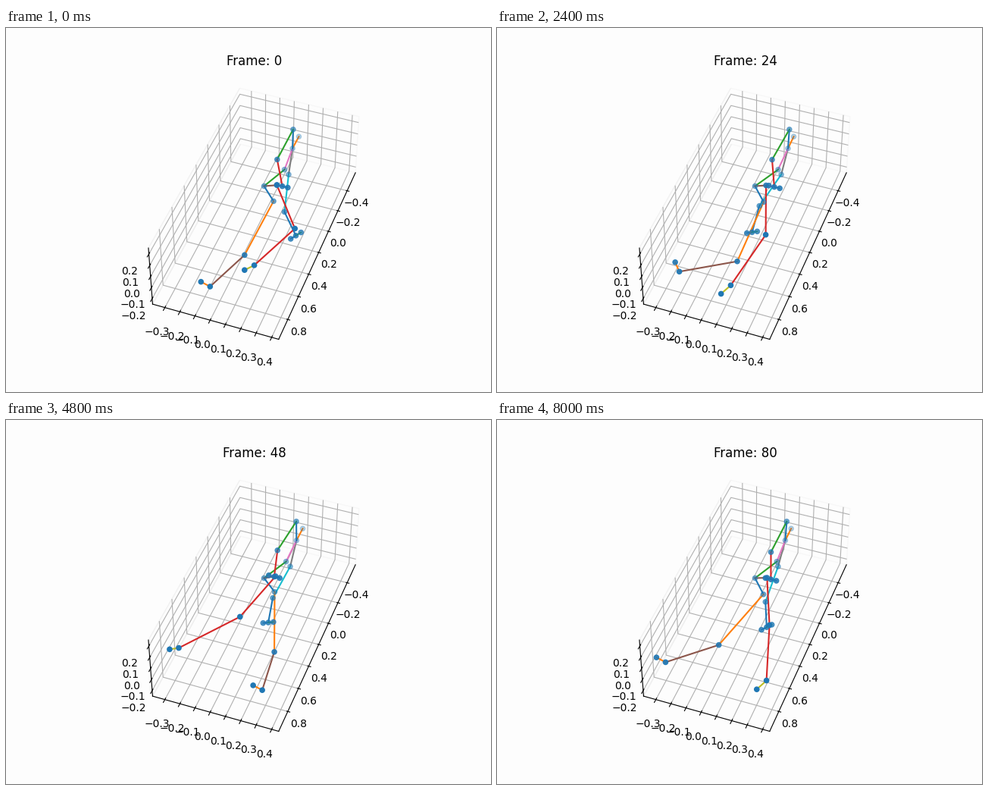
These frames come from a looping animation (640x480 px, 8.1 s). A matplotlib script:

```python
import numpy as np
import matplotlib.pyplot as plt
from matplotlib.animation import FuncAnimation

FRAMES, INTERVAL = 81, 100
STRIDE = 66  # frames per walking cycle
time = np.arange(FRAMES)


def wave(amp, peak, order=1):
    """Harmonic of the walking cycle with a crest at the given time."""
    return amp * np.cos(2 * np.pi * order * (time - peak) / STRIDE)


def flick(when):
    """Short push-off of a foot as its swing begins."""
    return np.exp(-((time - when) / 4) ** 2)


def path(x, y):
    return np.column_stack(np.broadcast_arrays(x, y, time)[:2])


# Screen paths; suffix a or 2 is the side nearer to the viewer.
joints = {
    "pelvis": path(340.5, 208.5),
    "spine": path(369.5 + wave(2, 32), 186.7),
    "neck": path(382 + wave(4, 35), 158.8),
    "head": path(390 + wave(3.7, 36), 143.2),
    "shoulder_a": path(382.9 + wave(4, 32), 133.8),
    "elbow_a": path(360 + wave(3, 25), 173 + wave(1.2, 13)),
    "wrist_a": path(361 + wave(4, 13) + wave(4, 28, 2), 208.4 + wave(1.8, 15)),
    "shoulder_b": path(374.5 + wave(3.4, 38) + wave(1.5, 0, 2), 193.2),
    "elbow_b": path(354.5 + wave(11, 65) + wave(2, 0, 2), 237 + wave(5.7, 3)),
    "wrist_b": path(353.5 + wave(25, 0) + wave(4, 0, 2), 270 + wave(4.5, 6)),
    "hip_1": path(353 + wave(1.5, 50), 228.3 + wave(1.6, 16)),
    "hip_2": path(356 + wave(1.5, 0), 207 + wave(1, 14)),
    "knee_1": path(327.5 + wave(32.6, 44) + wave(3.7, 32, 2),
                   304 + wave(7.2, 38) + wave(2.9, 28.2, 2)),
    "knee_2": path(347 + wave(31.3, 8.1) + wave(14, 30, 2),
                   266.3 + wave(6.9, 21.4) + wave(1.3, 0.7, 2)),
    "ankle_1": path(279 + wave(56.4, 47.2) + wave(6.9, 7.3, 2) + wave(2.2, 3.3, 3),
                    341.8 + wave(20.7, 46.5) + wave(9.6, 3.9, 2) + wave(2.1, 11.5, 3)),
    "ankle_2": path(295 + wave(62.1, 11.6) + wave(9.1, 3.8, 2) + wave(3.4, 14.1, 3),
                    321.2 + wave(24.7, 20.3) + wave(5.1, 7.8, 2)),
}
joints["toe_1"] = joints["ankle_1"] + path(-12 + 7 * flick(23), -6.3 - 6.5 * flick(23))
joints["toe_2"] = joints["ankle_2"] + path(-12.8 + 7 * flick(54),
                                           7 + wave(5, 18) - 4 * flick(54))
grips = {"a": path(7.2, 1.8), "b": path(6.8, -1.9 + wave(2.5, 37))}
for side, grip in grips.items():
    joints["inner_" + side] = joints["wrist_" + side] - grip
    joints["outer_" + side] = joints["wrist_" + side] + grip

# Bones from far to near, with their cycle colours.
BONES = [
    ("neck", "head", "C1"), ("neck", "shoulder_b", "C7"), ("spine", "neck", "C6"),
    ("neck", "shoulder_a", "C0"), ("pelvis", "spine", "C2"),
    ("shoulder_b", "elbow_b", "C9"), ("shoulder_a", "elbow_a", "C2"),
    ("elbow_b", "wrist_b", "C0"), ("wrist_b", "inner_b", "C0"),
    ("wrist_b", "outer_b", "C2"), ("pelvis", "hip_1", "C0"),
    ("pelvis", "hip_2", "C5"), ("elbow_a", "wrist_a", "C3"),
    ("wrist_a", "inner_a", "C4"), ("wrist_a", "outer_a", "C0"),
    ("hip_1", "knee_1", "C1"), ("knee_1", "ankle_1", "C5"),
    ("ankle_1", "toe_1", "C1"), ("hip_2", "knee_2", "C3"),
    ("knee_2", "ankle_2", "C3"), ("ankle_2", "toe_2", "C8"),
]
places = np.array(list(joints.values()))
nearness = np.array([0.3 * name.endswith(("_a", "_2")) for name in joints])

fig = plt.figure(figsize=(6.4, 4.8), dpi=100, facecolor="#fdfdfd")
ax = fig.add_subplot(projection="3d")
ax.patch.set_visible(False)
limits = [(-.585, .968), (-.382, .445), (-.252, .252)]
ax.set(xlim=limits[0], ylim=limits[1], zlim=limits[2])
ax.set_xticks(np.arange(-2, 5) * .2)
ax.set_yticks(np.arange(-3, 5) * .1)
ax.set_zticks(np.arange(-2, 3) * .1)
for axis in (ax.xaxis, ax.yaxis, ax.zaxis):
    axis.set_major_formatter("{x:.1f}")
    axis.pane.fill = False
ax.set_box_aspect([hi - lo for lo, hi in limits])
ax.view_init(elev=45, azim=20)
title = ax.set_title("Frame: 0")

stage = fig.add_axes([0, 0, 1, 1], zorder=5)
stage.set(xlim=(0, 640), ylim=(480, 0))
stage.axis("off")
lines = [stage.plot([], [], color=color, lw=1.5)[0] for *_, color in BONES]
dots = stage.scatter(*places[:, 0].T, s=20, color="C0", zorder=3)


def update(n):
    title.set_text(f"Frame: {n}")
    for line, (start, end, _) in zip(lines, BONES):
        line.set_data(*zip(joints[start][n], joints[end][n]))
    spots = places[:, n]
    # Joints fade with distance, which grows towards the top.
    alpha = np.clip(0.3 + 0.7 * (spots[:, 1] - 143) / 200 + nearness, 0.3, 1)
    dots.set_offsets(spots)
    dots.set_color([(31 / 255, 119 / 255, 180 / 255, a) for a in alpha])
    return [title, dots, *lines]


anim = FuncAnimation(fig, update, frames=FRAMES, interval=INTERVAL,
                     repeat=True, repeat_delay=0)
plt.show()
```
